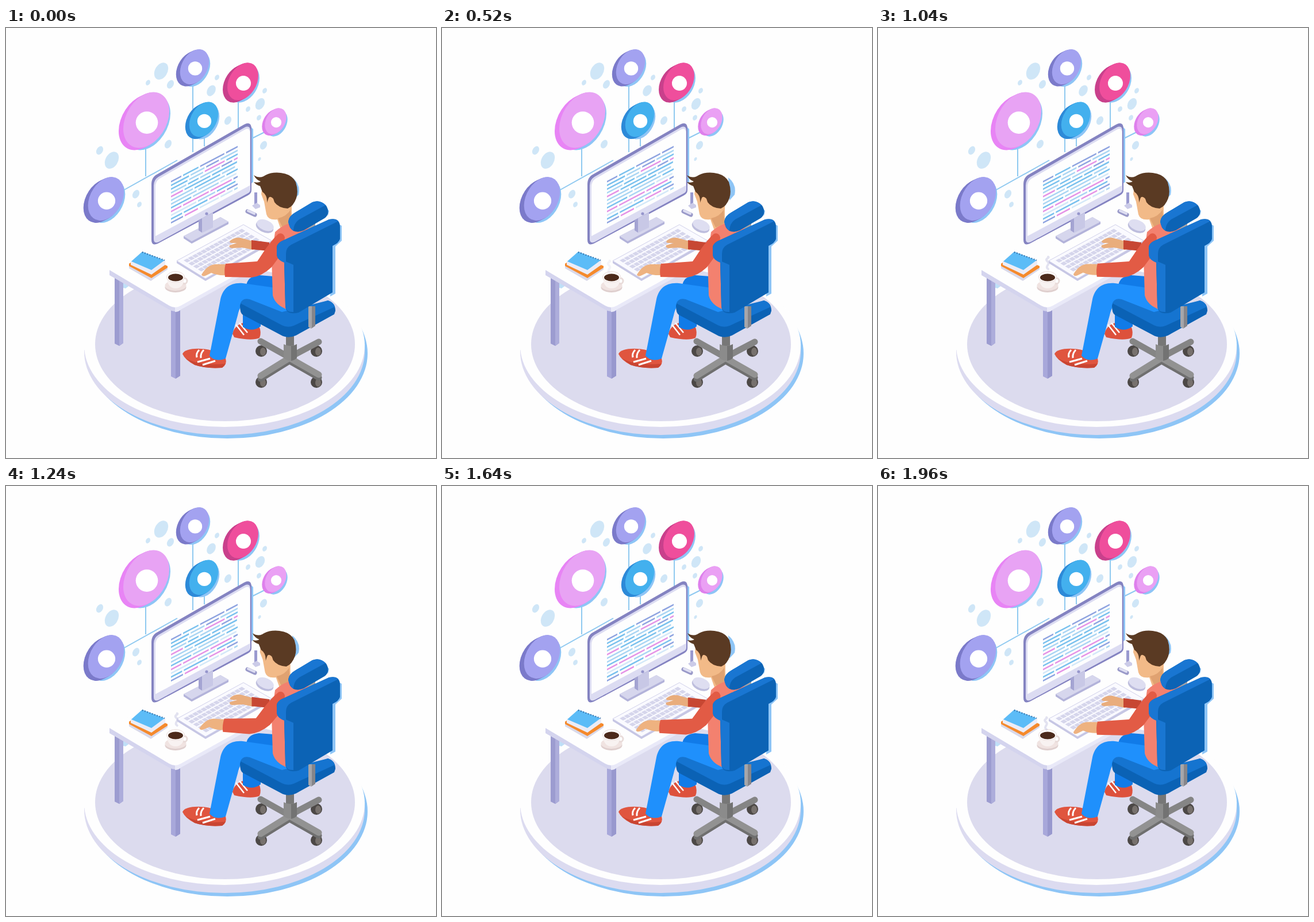
Recreate the animation shown at these times as an HTML page. Size 748 by 748 pixels, loop 2 s.

```html
<!DOCTYPE html>
<html lang="en">
<head>
<meta charset="utf-8">
<title>At the desk</title>
<style>
html, body { margin: 0; width: 100%; height: 100%; overflow: hidden; background: #fefefe }
svg { display: block; width: 100vw; height: 100vh }
</style>
</head>
<body>
<svg viewBox="0 0 748 748">
<!-- platform -->
<ellipse cx="385" cy="566" rx="244" ry="148" fill="#8ec5f6"/>
<path d="M136 560V563A244 145 0 0 0 624 563V550Z" fill="#dcdbf0"/>
<ellipse cx="380" cy="552" rx="244" ry="142" fill="#fefefe"/>
<ellipse cx="381" cy="550" rx="226" ry="134" fill="#dcdbee"/>

<g id="bubbles" fill="#cfe6f7"></g>
<path d="M243 208V258M203 283L298 230M325 100V216M345 188V206M404 128V178M450 181L426 193" fill="none" stroke="#8fc9f0" stroke-width="2"/>
<g id="discs"></g>

<!-- desk -->
<path d="M189 432H204V548L197 553 189 549Z" fill="#9c9cd0"/>
<path d="M197 436H204V548L197 553Z" fill="#adaddb"/>
<path d="M204 440L216 447 208 453 204 452Z" fill="#bfdff7"/>
<path d="M287 485H303V605L295 610 287 606Z" fill="#a8a8da"/>
<path d="M295 486H303V605L295 610Z" fill="#9898ce"/>
<path d="M180 421V430L284 490Q294 496 304 490L470 398V380Z" fill="#d4d4ee"/>
<path d="M294 486V494Q300 494 304 490L470 398V390Z" fill="#e9e9f8"/>
<path d="M180 421L260 374 430 280 475 345V388L304 483Q294 489 284 483Z" fill="#fefefe"/>

<!-- monitor -->
<path d="M424 170L430 176V268L424 272Z" fill="#8ec5f6"/>
<path d="M253 272Q253 260 262 255L414 168Q427 161 427 176V282Q427 288 421 291L264 375Q253 380 253 368Z" fill="#8483c1"/>
<path d="M257 274Q257 264 265 259L415 173Q425 168 425 180V281Q425 286 420 288L266 372Q257 376 257 367Z" fill="#dcdcf2"/>
<path d="M260 276Q260 267 267 262L415 177Q424 172 424 182V274L260 362Z" fill="#fefefe"/>
<circle cx="349" cy="323" r="2.6" fill="#9696cc"/>
<g id="code" transform="matrix(1 -.526 0 1 287 266)"></g>
<path d="M309 362V366L323 375 387 341V337L373 329Z" fill="#b3b3da"/>
<path d="M309 362L373 329 387 337 323 371Z" fill="#d6d6ed"/>
<path d="M335 334L360 321V347L342 356 335 352Z" fill="#c8c8e6"/>
<path d="M335 334L341 331V356L335 352Z" fill="#a4a4d2"/>

<!-- keyboard -->
<path d="M297 405V409L347 440 462 375V370Z" fill="#c6c6e4"/>
<path d="M297 405L413 342 462 370 347 436Z" fill="#fafaff" stroke="#d0d0ea"/>
<g id="keys" transform="matrix(1.16 -.63 .5 .31 297 405)" fill="#d6d6ec"></g>

<!-- small things -->
<path d="M432 286H437V309H432Z" fill="#9a9ad0"/>
<path d="M428 309L436 304 442 308V312L434 315Z" fill="#cbcbe8"/>
<path d="M420 319L433 325" stroke="#9a9ac9" stroke-width="7" stroke-linecap="round"/>
<path d="M421 318L432 323" stroke="#dedef2" stroke-width="4" stroke-linecap="round"/>
<ellipse cx="450" cy="346" rx="16" ry="9.5" fill="#bdbddd" transform="rotate(22 450 346)"/>
<ellipse cx="451" cy="343" rx="15.5" ry="9" fill="#dedef1" transform="rotate(22 451 343)"/>

<path d="M214 411L236 396 281 415V420L252 440 214 418Z" fill="#d9d9ea"/>
<path d="M214 410L236 395 281 414V417L253 435 214 414Z" fill="#f58a2c"/>
<path d="M217 406L237 390 277 405V412L253 429 217 412Z" fill="#ececf6"/>
<path d="M218 406L237 389 276 404 253 421Z" fill="#5cbcf7"/>
<path d="M237 390L276 404" stroke="#3b6ca0" stroke-width="2.5" stroke-dasharray="1.5 3"/>

<ellipse cx="295" cy="451" rx="18.5" ry="9" fill="#dfcfce"/>
<ellipse cx="295" cy="448" rx="18.5" ry="9" fill="#f0e3e1"/>
<circle cx="310" cy="440" r="5" fill="none" stroke="#e9dcda" stroke-width="3"/>
<path d="M280 434C280 446 286 453 295 453S310 446 310 434Z" fill="#f8f2f1"/>
<ellipse cx="295" cy="433" rx="15.5" ry="9.5" fill="#fffdfc" stroke="#eadddb"/>
<ellipse cx="295" cy="434" rx="13" ry="6.5" fill="#4c2a1b"/>
<path id="steam" d="M0 8C-7 3 5 0-1-5S3-11 0-13" fill="none" stroke="#cfcfe6" stroke-width="4" stroke-linecap="round"/>

<!-- far leg and arm -->
<path d="M394 532Q397 518 412 513L440 518Q445 530 441 539 428 545 397 538Z" fill="#dd513c"/>
<path d="M400 516L414 534M406 513L420 530" stroke="#fff" stroke-width="2.5" fill="none"/>
<path d="M418 448Q420 432 440 430L466 432V480L443 490V519Q428 530 412 520V480Z" fill="#117be8"/>
<g id="farArm">
<path d="M430 371L408 365Q397 364 390 370 387 373 393 374L402 374 389 378Q387 382 393 383L412 382 430 386Z" fill="#e9ad7c"/>
<path d="M427 369L458 373V388L427 385Z" fill="#c74733"/>
</g>

<!-- near leg -->
<path d="M307 567C311 556 340 556 358 561L382 574Q385 586 376 591 348 593 328 586 312 578 307 567Z" fill="#e0553f"/>
<path d="M312 574Q335 588 382 584L376 591Q348 593 328 586Z" fill="#c94532"/>
<path d="M336 560Q330 566 332 573M344 560Q338 566 339 574M333 581L355 575M342 586L364 579" stroke="#fff" stroke-width="3" fill="none"/>
<path d="M490 455L412 444C389 442 377 454 373 472L354 570Q364 582 382 575L403 500Q407 479 421 476L490 498Z" fill="#1f90fc"/>

<!-- chair base -->
<g id="wheels"></g>
<g stroke="#858585" stroke-width="11" stroke-linecap="round">
<path d="M493 573L443 545M493 573L544 546"/>
<path d="M493 579L443 610M493 579L544 608" stroke="#6f6f6f"/>
<path d="M493 574L443 605M493 574L544 603" stroke="#929292"/>
</g>
<path d="M487 530H501V560H487Z" fill="#777"/>
<path d="M483 550Q494 556 506 550V574Q494 583 483 574Z" fill="#8b8b8b"/>
<path d="M496 553Q502 553 506 550V574Q502 578 496 579Z" fill="#737373"/>

<!-- seat -->
<path d="M407 483Q408 474 418 472L486 500 560 474Q573 478 573 492L571 498 504 535Q490 541 478 534L412 499Q407 496 407 483Z" fill="#0b62b5"/>
<path d="M408 479Q411 469 424 472L480 494 560 474Q570 477 572 485L500 518Q490 522 480 517Z" fill="#1574d0"/>

<!-- head, torso, near arm -->
<path d="M498 260Q513 272 509 290L500 300Z" fill="#8ec5f6"/>
<g id="head">
<path d="M446 274L444 289 449 302 453 324Q456 335 472 333L478 350 497 346V306L478 270Z" fill="#f2ba88"/>
<path d="M473 331Q488 328 495 316L496 340 481 347Z" fill="#e0a271"/>
<path d="M431 256Q440 262 448 258 460 250 478 252 497 254 504 268 509 284 505 296 500 310 490 314 474 313 467 303L465 297Q458 290 456 298L454 304Q455 291 446 285L442 275Q435 273 431 268 439 270 443 267 435 264 431 256Z" fill="#5a3a23"/>
<ellipse cx="461" cy="302" rx="5" ry="7" fill="#f2ba88" transform="rotate(-15 461 302)"/>
</g>
<path d="M468 355Q478 345 492 340L527 345V480L490 490Q468 482 464 465L462 400Z" fill="#f3816f"/>
<g id="nearArm">
<path d="M384 411L364 411C352 412 346 420 340 429Q342 434 349 430L357 426Q368 431 384 430Z" fill="#eeb280"/>
<path d="M474 358C458 372 447 392 437 406L382 410Q379 421 381 433L427 434Q445 432 462 416L482 389 485 364Q482 355 474 358Z" fill="#e25b45"/>
</g>

<!-- chair back -->
<path d="M569 336L584 344V370L573 380V462L564 467Z" fill="#8ec5f6"/>
<path d="M555 310L562 318 560 327Z" fill="#8ec5f6"/>
<path d="M526 340H538V366H526Z" fill="#a3a3a8"/>
<path d="M526 484H538V518L531 523 526 520Z" fill="#a6a6aa"/>
<path d="M532 484H538V518L532 522Z" fill="#85858a"/>
<path d="M471 384Q470 376 479 371L562 333Q581 329 581 346V367Q579 374 568 379V460L509 495Q487 500 486 484L484 407Q472 403 471 394Z" fill="#0c63b5"/>
<path d="M471 384Q470 376 479 371L562 333Q573 331 578 336L496 377Q487 382 487 393V409Q471 404 471 394Z" fill="#1976d2"/>
<path d="M484 405L500 412V494Q487 495 486 484Z" fill="#1976d2"/>
<path d="M491 337Q492 327 503 321L533 303Q546 298 557 309 565 323 554 331L518 352Q502 359 494 347Z" fill="#0c63b5"/>
<path d="M491 337Q492 327 503 321L533 303Q546 298 556 308L510 333Q500 340 500 353 492 347 491 337Z" fill="#1976d2"/>
</svg>
<script>
const $ = id => document.getElementById(id);
const disc = (x, y, r, fill) =>
  `<circle r="${r}" transform="matrix(.87 -.33 0 1 ${x} ${y})" ${fill ? `fill="${fill}"` : ''}/>`;
const box = (x, y, w, h, extra = '') => `<rect x="${x}" y="${y}" width="${w}" height="${h}" ${extra}/>`;

$('bubbles').innerHTML = [
  [270, 75, 14], [286, 98, 7], [247, 95, 4.5], [357, 109, 9], [367, 86, 4.5], [184, 230, 14],
  [163, 213, 7], [282, 202, 7], [226, 289, 7], [232, 307, 4.5], [386, 161, 7], [442, 132, 9.5],
  [450, 109, 4.5], [421, 141, 4.5], [440, 156, 4.5], [448, 204, 7], [441, 228, 3]
].map(b => disc(...b)).join('');

// Each disc: centre, radius, rim depth, face and rim colours
$('discs').innerHTML = [
  [244, 160, 46, 8, '#e8a3f4', '#e884f5'],
  [174, 297, 36, 8, '#a3a2f0', '#7b7aca'],
  [328, 67.5, 29, 7, '#a3a2f0', '#7b7aca'],
  [412, 93, 31, 8, '#ef4e9c', '#c9408c'],
  [344, 159, 29, 7, '#43b0ee', '#2d8ad8'],
  [469, 162, 21.5, 5, '#eaa0f4', '#de80ec']
].map(([x, y, r, depth, face, rim]) => {
  let out = disc(x + 2, y + 4, r, '#8ec5f6');
  for (let i = depth; i > 0; i--) out += disc(x - i, y + i * .5, r, rim);
  return out + disc(x, y, r, face) + `<circle cx="${x + 1}" cy="${y + r * .1}" r="${r * .42}" fill="#fff"/>`;
}).join('');

let seed = 11;
const rand = () => (seed = seed * 16807 % 2147483647) / 2147483647;
const inks = ['#79c1ee', '#79c1ee', '#8ea3e0', '#e592e6', '#a9d5f3', '#d3e8f8'];
let lines = '';
for (let row = 0; row < 12; row++) {
  for (let x = 0; x < 112;) {
    const w = Math.min(18 + rand() * 28, 116 - x);
    const ink = inks[Math.floor(rand() * inks.length)];
    lines += box(x, row * 6.5, w, 2.8, `fill="${ink}"`);
    x += w + 3;
  }
}
$('code').innerHTML = lines;

let keys = '';
for (let row = 0; row < 5; row++)
  for (let col = 0; col < 14; col++) keys += box(6 + col * 6.3, 10 + row * 16.5, 5.4, 12);
$('keys').innerHTML = keys;

$('wheels').innerHTML = [[444, 562], [540, 562], [444, 616], [540, 616]].map(([x, y]) =>
  `<ellipse cx="${x}" cy="${y}" rx="10" ry="10" fill="#4c4846"/>
   <ellipse cx="${x + 3}" cy="${y + 1}" rx="5" ry="7" fill="#77716d"/>`).join('');

const swing = (t, period) => (1 - Math.cos(2 * Math.PI * t / period)) / 2;
const move = (id, value) => $(id).setAttribute('transform', value);

function draw(now) {
  const t = Math.floor(now % 2000 / 40) * 40;
  const lean = swing(t, 1000), tap = swing(t, 500);
  move('head', `translate(${-5 * lean} 0)`);
  move('nearArm', `translate(${-lean - 1.5 * tap} 0) rotate(${3.4 * tap} 470 400)`);
  move('farArm', `translate(${lean} ${-2 * tap})`);

  // A wisp rises once, then a second one begins before the loop restarts
  const age = t >= 1700 ? t - 1700 : t - 440;
  const rise = age / 1080;
  move('steam', `translate(${291 + 9 * rise} ${419 - 14 * rise})`);
  $('steam').style.opacity = age > 0 && rise < 1 ? .6 * Math.min(1, age / 200, (1 - rise) * 5) : 0;
  requestAnimationFrame(draw);
}
requestAnimationFrame(draw);
</script>
</body>
</html>
```
